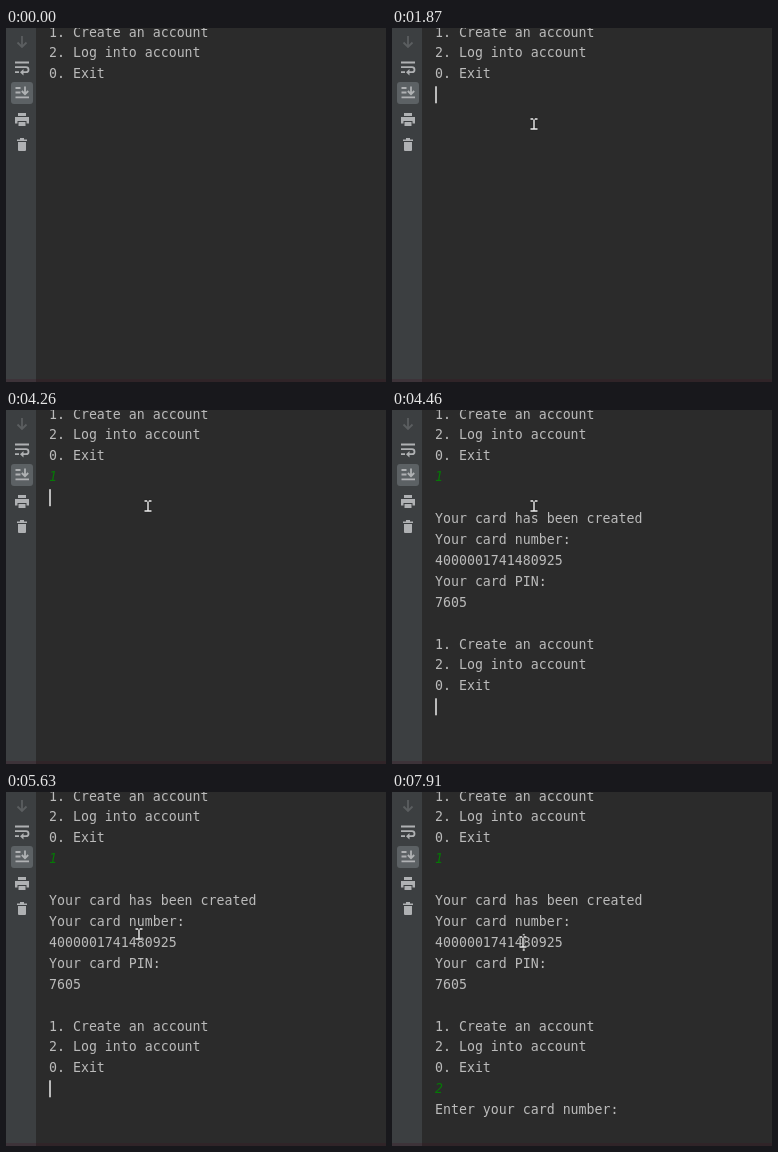
Animation, 380 px wide and 354 px high, one loop 8000 ms. Source, as an HTML page:

```html
<!DOCTYPE html>
<html lang="en">
<head>
<meta charset="utf-8">
<title>Console session</title>
<style>
  html, body { margin: 0; width: 100%; height: 100%; overflow: hidden; background: #2b2b2b; }
  svg { display: block; }
  text { font: 13.25px "DejaVu Sans Mono", "Noto Sans Mono", monospace; fill: #bbb; white-space: pre; }
  .typed { fill: #067806; font-style: italic; }
  .line { fill: none; stroke: #afb1b3; stroke-width: 1.8; }
  .solid { fill: #afb1b3; }
</style>
</head>
<body>
<svg width="380" height="354" viewBox="0 0 380 354">
  <rect width="380" height="354" fill="#2b2b2b"/>
  <rect width="30" height="354" fill="#3c3f41"/>
  <rect x="5" y="54" width="22" height="22" rx="3" fill="#5c6164"/>
  <!-- toolbar: down, wrap, scroll to end, print, clear -->
  <path class="line" style="stroke:#5b5e60" d="M16 8V19M11.5 14.5L16 19L20.5 14.5"/>
  <path class="line" d="M9 34.5H23M9 39.2H20a2.5 2.5 0 0 1 0 5H16M9 44.2H13"/>
  <path class="solid" d="M17.5 41V47.4L14 44.2Z"/>
  <path class="line" d="M9.5 60H14.5M9.5 64.5H14.5M9.5 69.3H23M19 58.5V66M15.8 63L19 66.2L22.2 63"/>
  <path class="solid" d="M12 85H20V88H12ZM9 89H23V95.5H20.5V93H11.5V95.5H9ZM12.5 94H19.5V98H12.5Z"/>
  <path class="solid" d="M11 111.5H14V110H18V111.5H21V113H11ZM12 114H20V122a1 1 0 0 1-1 1H13a1 1 0 0 1-1-1Z"/>
  <g id="log"></g>
  <rect id="caret" width="2" height="17" fill="#bbb"/>
  <g id="mouse" fill="none">
    <path d="M-3.5-5H3.5M0-5V5M-3.5 5H3.5" stroke="#222" stroke-width="3"/>
    <path d="M-3.5-5H-.8M.8-5H3.5M0-4.5V4.5M-3.5 5H3.5" stroke="#eee" stroke-width="1.4"/>
  </g>
  <rect y="351" width="380" height="3" fill="#401020" opacity=".25"/>
</svg>
<script>
const LOOP = 8000, BLINK = 500, FOCUS = 1680;
const LEFT = 43, ADVANCE = 7.977, PITCH = 20.91;
const baseline = row => 8.55 + PITCH * row;
const $ = id => document.getElementById(id);
const log = $("log"), caret = $("caret"), mouse = $("mouse");

const menu = ["1. Create an account", "2. Log into account", "0. Exit"];
const card = ["Your card has been created", "Your card number:", "4000001741480925",
              "Your card PIN:", "7605", ""];

// Every event restarts the caret's blinking; those with lines also print.
const print = (at, row, lines) => ({ at, row, lines, caretRow: row + lines.length, col: 0 });
const type = (at, row, key) => ({ at, row, lines: [key], caretRow: row, col: 1, typed: true });
const moveCaret = (at, caretRow, col) => ({ at, lines: [], caretRow, col });
const events = [
  print(0, 0, menu),
  moveCaret(FOCUS, 3, 0),
  type(3470, 3, "1"),
  moveCaret(4260, 4, 0),
  print(4460, 5, [...card, ...menu]),
  type(6030, 14, "2"),
  moveCaret(6620, 15, 0),
  print(6830, 15, ["Enter your card number:"]),
  moveCaret(7910, 7, 11)
];

// The pointer glides between two points, then rests until the next move.
const moves = [
  { at: 510, time: 90, from: [240, 219], to: [209, 155] },
  { at: 910, time: 180, from: [90.5, 53], to: [62, 24] },
  { at: 1870, time: 1, from: [142, 96], to: [142, 96] },
  { at: 5050, time: 400, from: [142, 96], to: [133, 142] },
  { at: 7610, time: 100, from: [133, 142], to: [131, 150] }
];

function addText(row, line, typed) {
  const text = document.createElementNS(log.namespaceURI, "text");
  text.setAttribute("x", LEFT);
  text.setAttribute("y", baseline(row));
  if (typed) text.setAttribute("class", "typed");
  text.textContent = line;
  log.append(text);
  return text;
}
for (const e of events) e.texts = e.lines.map((line, i) => addText(e.row + i, line, e.typed));

const show = (el, on) => { el.style.display = on ? "" : "none"; };
const place = (el, x, y) => el.setAttribute("transform", `translate(${x} ${y})`);
const latest = (list, t) => list.filter(item => item.at <= t).pop();

function draw(t) {
  for (const e of events) e.texts.forEach(text => show(text, t >= e.at));

  const event = latest(events, t);
  show(caret, t >= FOCUS && (t - event.at) % (2 * BLINK) < BLINK);
  place(caret, LEFT + event.col * ADVANCE, baseline(event.caretRow) - 13);

  const move = latest(moves, t);
  show(mouse, move);
  if (move) {
    const k = Math.min(1, (t - move.at) / move.time);
    place(mouse, ...move.from.map((a, i) => a + (move.to[i] - a) * k));
  }
}

const start = performance.now();
function tick() {
  draw((performance.now() - start) % LOOP);
  requestAnimationFrame(tick);
}
tick();
</script>
</body>
</html>
```
